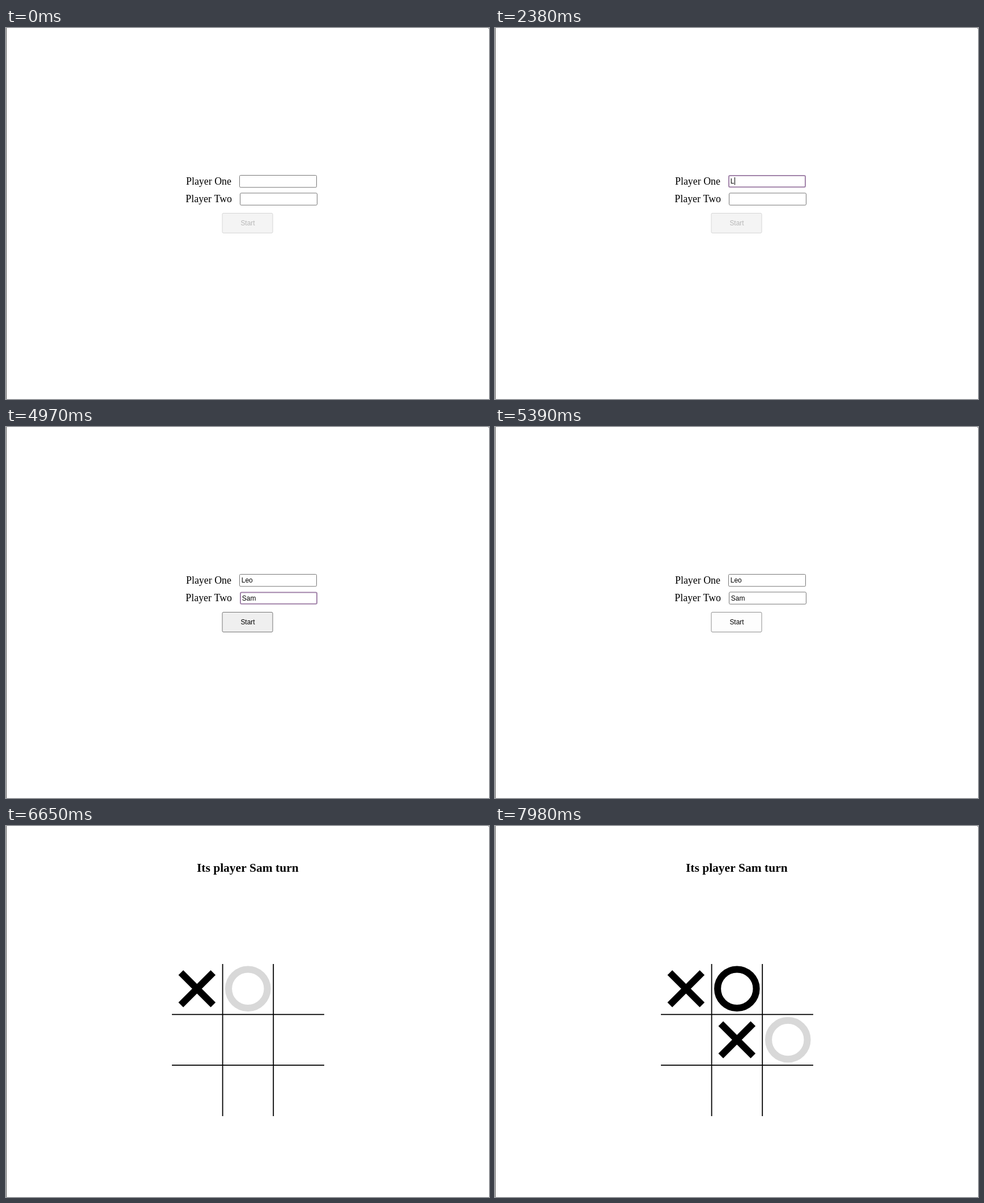
An HTML page with a canvas for the animation above (8 s loop, 853 px wide and 656 px high).

```html
<!DOCTYPE html>
<html lang="en">
<head>
<meta charset="utf-8">
<title>Noughts and crosses</title>
<style>
  html, body { margin: 0; width: 100%; height: 100%; overflow: hidden; background: #fff; }
  canvas { display: block; }
</style>
</head>
<body>
<canvas id="stage" width="853" height="656"></canvas>
<script>
const ctx = document.getElementById('stage').getContext('2d');
const LOOP = 8000, BLINK = 490;
const SERIF = '"Liberation Serif", serif', SANS = '"Liberation Sans", sans-serif';
const GREY = '#767676', DARK = '#4f4f4f', RING = '#a284aa', HOVER = '#d8d8d8';

const fields = [
  { label: 'Player One', labelX: 318, x: 412, y: 260, name: 'Leo',
    keys: [2380, 2730, 2940], focus: 1610, blur: 3290, hover: [1330, 4970] },
  { label: 'Player Two', labelX: 317.3, x: 413, y: 291.4, name: 'Sam',
    keys: [3990, 4200, 4410], focus: 3290, blur: 5320, hover: [0, 0] }
];
const BOARD_AT = 5460;
// Each mark previews in grey from `from` to `to`; it turns black at `set` if it is played.
const marks = [
  { kind: 'x', col: 1, row: 1, from: 5460, to: 5810 },
  { kind: 'x', col: 1, row: 0, from: 5810, to: 6020 },
  { kind: 'x', col: 0, row: 0, from: 6020, set: 6300 },
  { kind: 'o', col: 1, row: 0, from: 6510, set: 7070 },
  { kind: 'x', col: 1, row: 1, from: 7210, set: 7770 },
  { kind: 'o', col: 2, row: 1, from: 7980 }
];

function text(str, x, y, font, color = '#000', align = 'left') {
  ctx.font = font;
  ctx.fillStyle = color;
  ctx.textAlign = align;
  ctx.fillText(str, x, y);
}

function box(x, y, w, h, border, fill, line = 1) {
  ctx.beginPath();
  ctx.roundRect(x + line / 2, y + line / 2, w - line, h - line, 2);
  ctx.fillStyle = fill;
  ctx.fill();
  ctx.strokeStyle = border;
  ctx.lineWidth = line;
  ctx.stroke();
}

function drawField(f, t) {
  const focused = t >= f.focus && t < f.blur;
  const hovered = t >= f.hover[0] && t < f.hover[1];
  const pressed = f.keys.filter(k => t >= k);
  const typed = f.name.slice(0, pressed.length);
  text(f.label, f.labelX, f.y + 17, '17.9px ' + SERIF);
  box(f.x, f.y, 137, 22.3, focused ? RING : hovered ? DARK : GREY, '#fff', focused ? 2 : 1);
  text(typed, f.x + 3.8, f.y + 15.4, '11.93px ' + SANS);
  const sinceInput = t - Math.max(f.focus, ...pressed);
  if (focused && Math.floor(sinceInput / BLINK) % 2 === 0) {
    const caretX = Math.round(f.x + 4 + ctx.measureText(typed).width);
    ctx.fillRect(caretX, Math.round(f.y + 4.4), 1, 13.5);
  }
}

function drawButton(t) {
  let [fill, border, color] = ['#f4f4f4', '#d6d6d6', '#b7b7b7'];
  if (t >= 3990) [fill, border, color] = ['#efefef', GREY, '#000'];
  if (t >= 5250) [fill, border] = ['#e5e5e5', DARK];
  if (t >= 5320) [fill, border] = ['#fdfdfd', '#8d8d8d'];
  box(381.5, 327, 90, 36, border, fill);
  text('Start', 427, 349, '11.93px ' + SANS, color, 'center');
}

function drawMark(m, t) {
  const x = 427.3 + 90 * (m.col - 1), y = 287.7 + 90.3 * m.row, arm = 28.5;
  ctx.strokeStyle = t >= m.set ? '#000' : HOVER;
  ctx.lineWidth = 12.08;
  ctx.beginPath();
  if (m.kind === 'o') {
    ctx.arc(x, y, 34.24, 0, 2 * Math.PI);
  } else {
    for (const s of [1, -1]) {
      ctx.moveTo(x - arm, y - s * arm);
      ctx.lineTo(x + arm, y + s * arm);
    }
  }
  ctx.stroke();
}

function drawBoard(t) {
  const turns = marks.filter(m => t >= m.set).length;
  text(`Its player ${fields[turns % 2].name} turn`, 426.8, 81, 'bold 21.5px ' + SERIF, '#000', 'center');
  for (const m of marks) {
    if (t >= m.from && !(t >= m.to)) drawMark(m, t);
  }
  ctx.fillStyle = '#000';
  for (const d of [0, 89.6]) {
    ctx.fillRect(381.7 + d, 244, 1.8, 269);
    ctx.fillRect(293, 332.4 + d, 269, 1.8);
  }
}

function draw(t) {
  ctx.fillStyle = '#fff';
  ctx.fillRect(0, 0, 853, 656);
  ctx.fillStyle = '#555';
  ctx.fillRect(0, 0, 1, 656);
  ctx.fillRect(852, 0, 1, 1);
  if (t < BOARD_AT) {
    fields.forEach(f => drawField(f, t));
    drawButton(t);
  } else {
    drawBoard(t);
  }
}

function tick() {
  draw(performance.now() % LOOP);
  requestAnimationFrame(tick);
}
tick();
</script>
</body>
</html>
```
